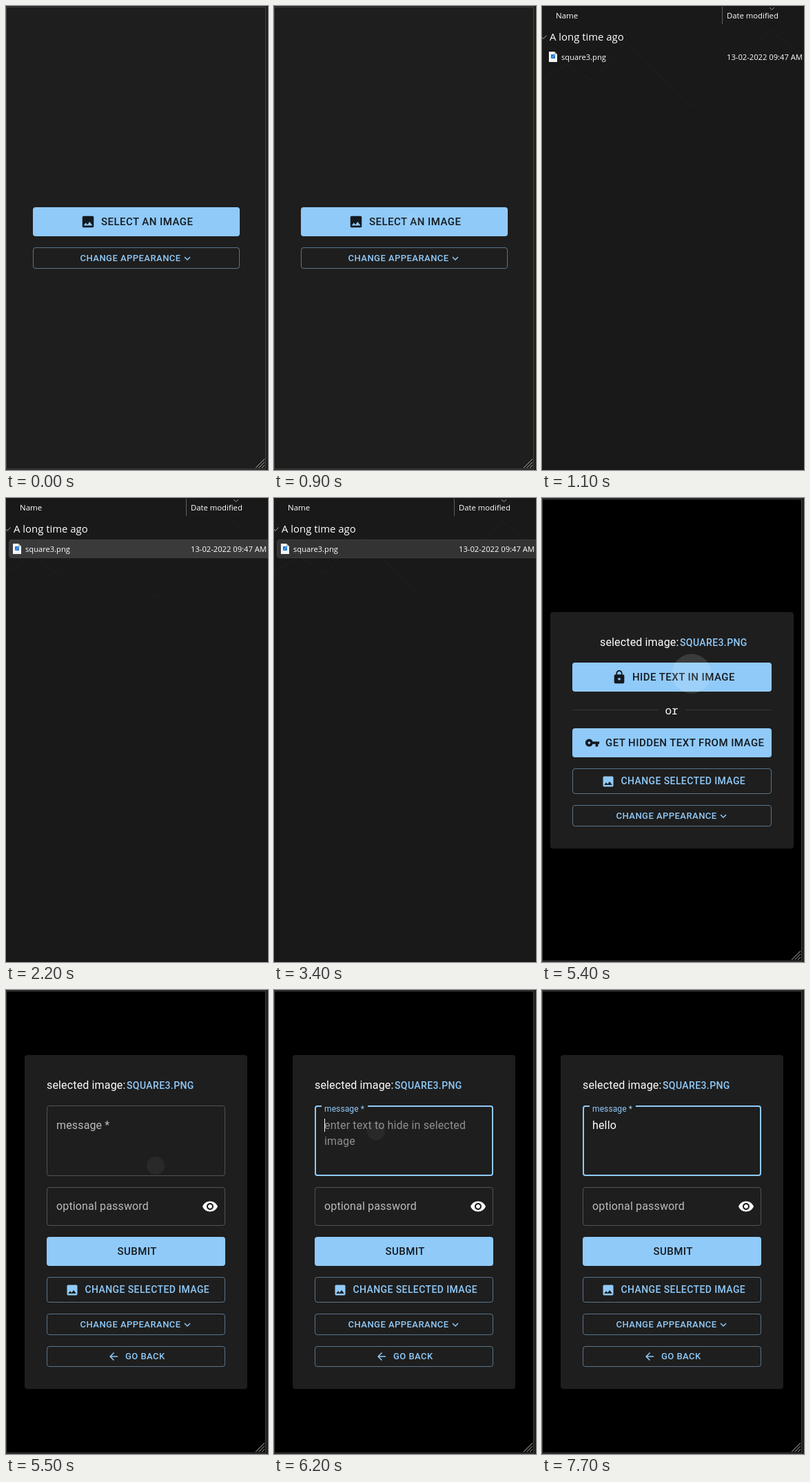
Write an HTML page that moves like this. It is 380 px wide and 671 px high and loops after 8000 ms.

```html
<!DOCTYPE html>
<html lang="en">
<head>
<meta charset="utf-8">
<title>Hide text in image</title>
<style>
  html, body { margin: 0; height: 100%; overflow: hidden; background: #1e1e1e; }
  svg { display: block; width: 100vw; height: 100vh; }
  text { font-family: Roboto, sans-serif; white-space: pre; }
  .dialog text { font-family: "Open Sans", "Noto Sans", sans-serif; }
  .large, .medium, .small { font-weight: 500; }
  .large { font-size: 15px; letter-spacing: .46px; }
  .medium { font-size: 14px; letter-spacing: .4px; }
  .small { font-size: 13px; letter-spacing: .46px; }
  .body { font-size: 16px; letter-spacing: .15px; }
  .mono { font: 16px "Noto Sans Mono", "DejaVu Sans Mono", monospace; }
</style>
</head>
<body>
<svg id="stage" viewBox="0 0 380 671"></svg>
<script>
const LOOP = 8000, BLUE = '#90caf9', INK = '#13191f', PAPER = '#1e1e1e';
const ICONS = {
  image: 'M21 19V5c0-1.1-.9-2-2-2H5c-1.1 0-2 .9-2 2v14c0 1.1.9 2 2 2h14c1.1 0 2-.9 2-2zM8.5 13.5l2.5 3.01L14.5 12l4.5 6H5l3.5-4.5z',
  lock: 'M18 8h-1V6c0-2.76-2.24-5-5-5S7 3.24 7 6v2H6c-1.1 0-2 .9-2 2v10c0 1.1.9 2 2 2h12c1.1 0 2-.9 2-2V10c0-1.1-.9-2-2-2zm-6 9c-1.1 0-2-.9-2-2s.9-2 2-2 2 .9 2 2-.9 2-2 2zm3.1-9H8.9V6c0-1.71 1.39-3.1 3.1-3.1 1.71 0 3.1 1.39 3.1 3.1v2z',
  key: 'M12.65 10C11.83 7.67 9.61 6 7 6c-3.31 0-6 2.69-6 6s2.69 6 6 6c2.61 0 4.83-1.67 5.65-4H17v4h4v-4h2v-4H12.65zM7 14c-1.1 0-2-.9-2-2s.9-2 2-2 2 .9 2 2-.9 2-2 2z',
  eye: 'M12 4.5C7 4.5 2.73 7.61 1 12c1.73 4.39 6 7.5 11 7.5s9.27-3.11 11-7.5c-1.73-4.39-6-7.5-11-7.5zM12 17c-2.76 0-5-2.24-5-5s2.24-5 5-5 5 2.24 5 5-2.24 5-5 5zm0-8c-1.66 0-3 1.34-3 3s1.34 3 3 3 3-1.34 3-3-1.34-3-3-3z',
  back: 'M20 11H7.83l5.59-5.59L12 4l-8 8 8 8 1.41-1.41L7.83 13H20v-2z',
  chevron: 'M7.41 8.59 12 13.17l4.59-4.58L18 10l-6 6-6-6z'
};

const text = (x, y, str, cls, fill = '#fff', extra = '') =>
  `<text x="${x}" y="${y}" class="${cls}" fill="${fill}" ${extra}>${str}</text>`;
const label = (x, y, str, size) => text(x, y, str, '', '#fff', `font-size="${size}"`);
const box = (x1, y1, x2, y2, fill, r = 4) =>
  `<rect x="${x1}" y="${y1}" width="${x2 - x1}" height="${y2 - y1}" rx="${r}" fill="${fill}"/>`;
const outline = (x1, y1, x2, y2, stroke, w = 1) =>
  `<rect x="${x1 + w / 2}" y="${y1 + w / 2}" width="${x2 - x1 - w}" height="${y2 - y1 - w}" rx="${4 - w / 2}" fill="none" stroke="${stroke}" stroke-width="${w}"/>`;
const icon = (name, cx, cy, size, fill = BLUE) =>
  `<path d="${ICONS[name]}" fill="${fill}" transform="translate(${cx - size / 2} ${cy - size / 2}) scale(${size / 24})"/>`;
const line = (d, stroke, w = 1) => `<path d="${d}" fill="none" stroke="${stroke}" stroke-width="${w}"/>`;
const group = (id, body, attrs = '') => `<g id="${id}" ${attrs}>${body}</g>`;

const FAINT = 'rgba(255,255,255,.23)', EDGE = 'rgba(144,202,249,.5)';
const filled = (x1, x2, y, tx, str) => box(x1, y, x2, y + 42, BLUE) + text(tx, y + 26, str, 'large', INK);
const appearance = (x1, x2, y) => outline(x1, y, x2, y + 31, EDGE) +
  text(107.5, y + 20, 'CHANGE APPEARANCE', 'small', BLUE) + icon('chevron', 263, y + 16, 18);
const changeImage = (x1, x2, y) => outline(x1, y, x2, y + 37, EDGE) +
  icon('image', 96, y + 19, 20) + text(114.5, y + 23, 'CHANGE SELECTED IMAGE', 'medium', BLUE);
const selected = (x, y) => text(x, y, 'selected image:', 'body') + text(x + 116, y, 'SQUARE3.PNG', 'medium', BLUE);
const windowFrame = bg =>
  `<rect x=".5" y="1.5" width="376" height="668" fill="${bg}" stroke="#444"/>` +
  line('M362 668l13-13M366.500 668l8.500-8.500M371 668l4-4', '#b0b0b0');

const home = windowFrame(PAPER) +
  filled(39, 339, 291, 138, 'SELECT AN IMAGE') + icon('image', 119, 312, 22, INK) +
  appearance(39, 339, 349);

const menu = windowFrame('#000') + box(12, 165, 365, 507, PAPER) + selected(84, 214) +
  filled(44, 333, 238, 131, 'HIDE TEXT IN IMAGE') + icon('lock', 112, 259, 22, INK) +
  line('M44 306.500H169M208 306.500H333', '#393939') + text(178.5, 313, 'or', 'mono') +
  filled(44, 333, 333, 92, 'GET HIDDEN TEXT FROM IMAGE') + icon('key', 73, 354, 22, INK) +
  changeImage(44, 333, 391) + appearance(44, 333, 444);

const form = windowFrame('#000') + box(27, 94, 350, 577, PAPER) + selected(59, 143) +
  group('idle', outline(59, 167, 318, 269, FAINT)) +
  group('focused', outline(59, 167, 318, 269, BLUE, 2) + box(69, 166, 136, 170, PAPER, 0)) +
  group('hint', text(73, 201, 'enter text to hide in selected', 'body', '#8f8f8f') +
    text(73, 224, 'image', 'body', '#8f8f8f')) +
  group('floating', text(0, 0, 'message *', 'body', 'inherit')) +
  text(73, 201, '', 'body', '#fff', 'id="typed"') +
  '<rect id="caret" y="186" width="1" height="19" fill="#fff"/>' +
  outline(59, 285, 318, 341, FAINT) + text(73, 318, 'optional password', 'body', '#bbb') +
  icon('eye', 296, 313, 24, '#fff') +
  filled(59, 318, 357, 161.5, 'SUBMIT') + changeImage(59, 318, 415) + appearance(59, 318, 468) +
  outline(59, 515, 318, 545, EDGE) + icon('back', 156, 530, 18) + text(173, 534, 'GO BACK', 'small', BLUE);

const dialog = box(0, 0, 380, 671, '#191919', 0) +
  line('M0 108L36 84L75 110L120 52L217 145L330 34L380 72', '#202020') +
  '<rect id="row" x="4.500" y="60.500" width="378" height="26" rx="3"/>' +
  label(20, 18, 'Name', 11.5) + label(268, 18, 'Date modified', 11.3) +
  line('M261.500 1V26', '#606060') + line('M330 2l3.500 3.500L337 2', '#999') +
  line('M0 45l2 2.500 4.500-5', '#aaa') + label(11, 50, 'A long time ago', 14.9) +
  '<path d="M10 66h8l4 4v11h-12z" fill="#f4f4f4"/><path d="M18 66v4h4z" fill="#bbb"/>' +
  box(13, 70, 19, 76, '#1976d2', 1) + line('M14 75l4-4', '#9fd2ff') +
  label(28, 78, 'square3.png', 11.15) + label(268, 78, '13-02-2022 09:47 AM', 11.2);

const stage = document.getElementById('stage');
stage.innerHTML = group('home', home) + group('menu', menu) + group('form', form) +
  '<circle id="click" fill="#fff" fill-opacity=".12"/>' + group('dialog', dialog, 'class="dialog"');

const el = id => document.getElementById(id);
const show = (id, on) => el(id).setAttribute('visibility', on ? 'inherit' : 'hidden');
const set = (id, attrs) => { for (const k in attrs) el(id).setAttribute(k, attrs[k]); };

const CLICKS = [[800, 200, 312], [5400, 217, 254], [6100, 148, 204]];
const KEY_TIMES = [6900, 7100, 7200, 7400, 7500];
const ROW_STYLES = [[3400, '#333', '#3d3d3d'], [2200, '#3a3a3a', '#3d3d3d'], [1700, '#2b2b2b', '#2b2b2b'], [0, 'none', 'none']];

function draw(now) {
  const t = Math.floor(now % LOOP / 100) * 100;
  const between = (a, b) => t >= a && t < b;

  el('home').style.display = t < 3700 ? '' : 'none';
  el('menu').style.display = between(3700, 5500) ? '' : 'none';
  el('form').style.display = t >= 5500 ? '' : 'none';

  set('dialog', { opacity: between(1100, 3600) ? 1 : t === 1000 ? .5 : t === 3600 ? .3 : 0 });
  const [, fill, stroke] = ROW_STYLES.find(s => t >= s[0]);
  set('row', { fill, stroke });

  // The pointer's click halo shrinks and fades over two steps.
  const click = CLICKS.find(c => between(c[0], c[0] + 200));
  show('click', click);
  if (click) {
    const first = t === click[0];
    set('click', { cx: click[1], cy: click[2], r: first ? 28.5 : 13, 'fill-opacity': first ? .13 : .05 });
  }

  const float = t < 6100 ? 0 : t < 6200 ? .6 : 1;
  const typed = 'hello'.slice(0, KEY_TIMES.filter(k => t >= k).length);
  show('idle', !float);
  show('focused', float);
  show('hint', !typed);
  set('hint', { opacity: float });
  set('floating', {
    transform: `translate(73 ${201 - 30 * float}) translate(0 ${5 * float}) scale(${1 - .25 * float})`,
    fill: float ? BLUE : '#bbb'
  });
  el('typed').textContent = typed;
  show('caret', between(6100, 6700) || between(6900, 7700));
  set('caret', { x: Math.round(73 + (typed ? el('typed').getComputedTextLength() - .4 : 0)) });

  requestAnimationFrame(() => draw(performance.now() - start));
}
const start = performance.now();
draw(0);
</script>
</body>
</html>
```
